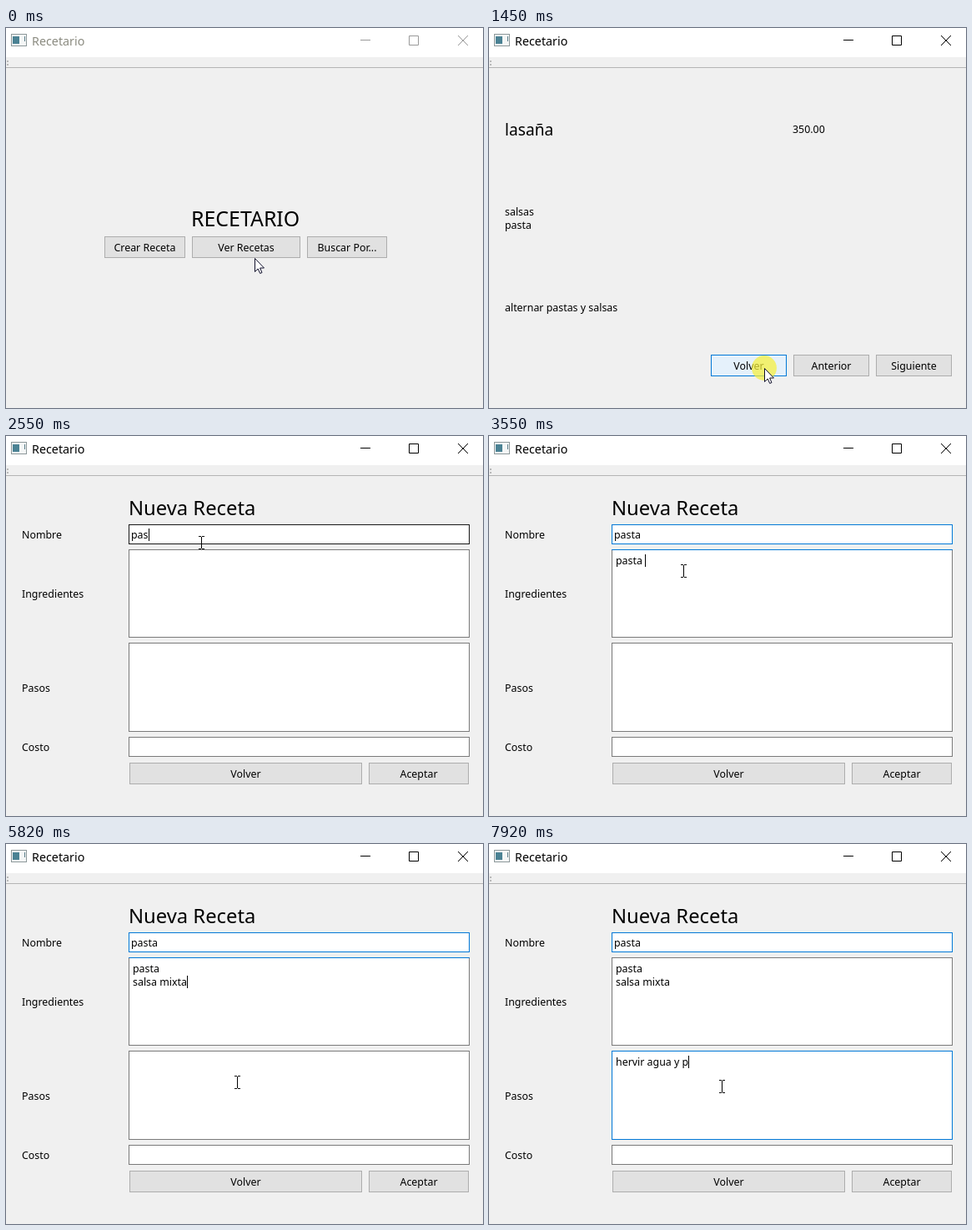
Write an HTML page that moves like this. It is 572x456 px and loops after 8000 ms.

```html
<!DOCTYPE html>
<html lang="es">
<head>
<meta charset="utf-8">
<title>Recetario</title>
<style>
html, body { margin: 0; width: 100%; height: 100%; overflow: hidden; background: #f0f0f0; }
svg { display: block; width: 572px; height: 456px; }
text { font: 12.4px "Noto Sans", "Open Sans", sans-serif; white-space: pre; }
.btn { fill: #e1e1e1; stroke: #adadad; }
.btn.hover { fill: #e5f1fb; stroke: #0078d7; }
.field { fill: #fff; stroke: #7a7a7a; }
</style>
</head>
<body>
<svg id="stage" viewBox="0 0 572 456">
  <rect width="572" height="35" fill="#fff"/>
  <path d="M0 47.5H572" stroke="#b4b4b4"/>
  <path d="M1 39h2v2h-2zM1 43h2v2h-2z" fill="#b8b8b8"/>
  <rect x="6.5" y="7.5" width="18" height="14" fill="#f4f6f6" stroke="#8c9799"/>
  <rect x="8" y="10" width="8" height="9" fill="#4b8294"/>
  <path d="M22.5 10V16" stroke="#5d7f8a"/>
  <text id="caption" x="31" y="21" style="font-size:14.3px">Recetario</text>
  <path id="controls" fill="none" d="M425 14.5h12M483.5 9.5h11v11h-11zM542 9l12 12M554 9l-12 12"/>
</svg>
<script>
const LOOP = 8000, STEP = 111.4, BLUE = '#0078d7';
const stage = document.getElementById('stage');
const caption = document.getElementById('caption');
const controls = document.getElementById('controls');

function add(parent, tag, attrs, content = '') {
  const el = document.createElementNS('http://www.w3.org/2000/svg', tag);
  for (const key in attrs) el.setAttribute(key, attrs[key]);
  el.textContent = content;
  parent.append(el);
  return el;
}
const show = (el, on) => el.setAttribute('visibility', on ? 'inherit' : 'hidden');
const page = () => add(stage, 'g', {});
const label = (parent, x, y, content, size = 12.4) =>
  add(parent, 'text', { x, y, style: `font-size:${size}px` }, content);

const buttons = [];
function button(parent, x, y, w, content) {
  const box = add(parent, 'rect', { x: x + .5, y: y + .5, width: w - 1, height: 25, class: 'btn' });
  add(parent, 'text', { x: x + w / 2, y: y + 18, 'text-anchor': 'middle' }, content);
  buttons.push({ parent, box, x, y, w, h: 26 });
}
function field(parent, y, h) {
  return add(parent, 'rect', { x: 147.5, y: y + .5, width: 408, height: h - 1, class: 'field' });
}

const menu = page();
label(menu, 222, 238, 'RECETARIO', 24.9);
button(menu, 118, 250, 97, 'Crear Receta');
button(menu, 223, 250, 130, 'Ver Recetas');
button(menu, 361, 250, 96, 'Buscar Por...');

const recipe = page();
label(recipe, 19, 129, 'lasaña', 19.2);
label(recipe, 364, 126, '350.00');
label(recipe, 19, 225, 'salsas');
label(recipe, 19, 241, 'pasta');
label(recipe, 19, 340, 'alternar pastas y salsas');
button(recipe, 266, 392, 91, 'Volver');
button(recipe, 365, 392, 91, 'Anterior');
button(recipe, 464, 392, 91, 'Siguiente');

const form = page();
label(form, 147, 95, 'Nueva Receta', 23.8);
label(form, 19, 123, 'Nombre');
label(form, 19, 194, 'Ingredientes');
label(form, 19, 307, 'Pasos');
label(form, 19, 378, 'Costo');
const nameBox = field(form, 106, 24);
field(form, 136, 106);
const stepsBox = field(form, 248, 107);
field(form, 361, 24);
const focusLine = add(form, 'path', { d: 'M147 136.5H556', stroke: BLUE });
button(form, 148, 392, 279, 'Volver');
button(form, 435, 392, 120, 'Aceptar');

// Each run: [text, time of first letter, time of last letter]
const lines = [
  { x: 150, y: 123, from: 2220, to: 2880, runs: [['pasta', 2330, 2750]] },
  { x: 152, y: 154, from: 2880, to: 3770, runs: [['pasta ', 2990, 3550]] },
  { x: 152, y: 170, from: 3770, to: 5920, runs: [['salsa', 3880, 4350], [' m', 4550, 4650], ['ixta', 4890, 5370]] },
  { x: 152, y: 266, from: 5920, to: LOOP, runs: [['her', 6140, 6360], ['vir agu', 6580, 7360], ['a y p', 7480, 7920]] }
];
for (const line of lines) line.el = label(form, line.x, line.y, '');
const caret = add(form, 'path', { stroke: '#000' });

function typed(runs, t) {
  return runs.map(([s, a, b]) =>
    t < a ? '' : s.slice(0, 1 + Math.floor((t - a) / (b - a) * (s.length - 1) + .05))).join('');
}

const click = add(stage, 'circle', { r: 15, fill: '#f5f03c', 'fill-opacity': .72 });
const arrow = add(stage, 'path', {
  d: 'M.5 .5V16.5L4.2 13L6.7 18.5L9 17.5L6.6 12H11.5Z', fill: '#fff', stroke: '#10102c'
});
const beam = add(stage, 'path', {
  d: 'M-3 -7.5H0M1 -7.5H4M.5 -7V7M-3 7.5H0M1 7.5H4', fill: 'none', stroke: '#000'
});

// Pointer path: [time, x, y]
const path = [
  [0, 298, 276], [100, 295, 268], [340, 293, 264], [660, 517, 411], [890, 517, 411],
  [1110, 432, 415], [1330, 330, 408], [1560, 330, 408], [1890, 178, 266], [2110, 178, 266],
  [2330, 234, 128], [2750, 234, 128], [2870, 233, 162], [5600, 233, 162], [5800, 279, 291], [LOOP, 279, 291]
];
const clicks = [[220, 340], [1440, 1550], [2000, 2110], [2220, 2330], [2870, 2980], [5910, 6020]];

function pointer(t) {
  const i = Math.max(1, path.findIndex(p => p[0] >= t));
  const [a, ax, ay] = path[i - 1], [b, bx, by] = path[i];
  const k = Math.min(1, (t - a) / (b - a));
  return [Math.round(ax + (bx - ax) * k), Math.round(ay + (by - ay) * k)];
}

function draw(t) {
  const current = t < 340 ? menu : t < 1550 ? recipe : t < 2110 ? menu : form;
  for (const p of [menu, recipe, form]) show(p, p === current);

  const active = t >= 100;
  caption.setAttribute('fill', active ? '#000' : '#8b8b80');
  controls.setAttribute('stroke', active ? '#000' : '#999');

  const [x, y] = pointer(Math.floor((t + 35) / STEP) * STEP);
  for (const b of buttons) {
    const over = b.parent === current && x >= b.x && x < b.x + b.w && y >= b.y && y < b.y + b.h;
    b.box.classList.toggle('hover', over);
  }
  const overField = current === form && x > 147 && y > 106 && y < 385;
  const place = `translate(${x} ${y})`;
  for (const el of [click, arrow, beam]) el.setAttribute('transform', place);
  show(arrow, !overField);
  show(beam, overField);
  show(click, clicks.some(([a, b]) => t >= a && t < b));

  nameBox.style.stroke = t < 2220 ? '' : t < 2870 ? '#171717' : BLUE;
  stepsBox.style.stroke = t < 5920 ? '' : BLUE;
  focusLine.style.display = t >= 2880 && t < 5920 ? '' : 'none';

  for (const line of lines) {
    line.el.textContent = typed(line.runs, t);
    if (t >= line.from && t < line.to) {
      const cx = Math.round(line.x + line.el.getComputedTextLength()) + .5;
      caret.setAttribute('d', `M${cx} ${line.y - 12}v15`);
    }
  }
  show(caret, t >= 2220);
}

function frame(now) {
  draw(now % LOOP);
  requestAnimationFrame(frame);
}
draw(0);
requestAnimationFrame(frame);
</script>
</body>
</html>
```
